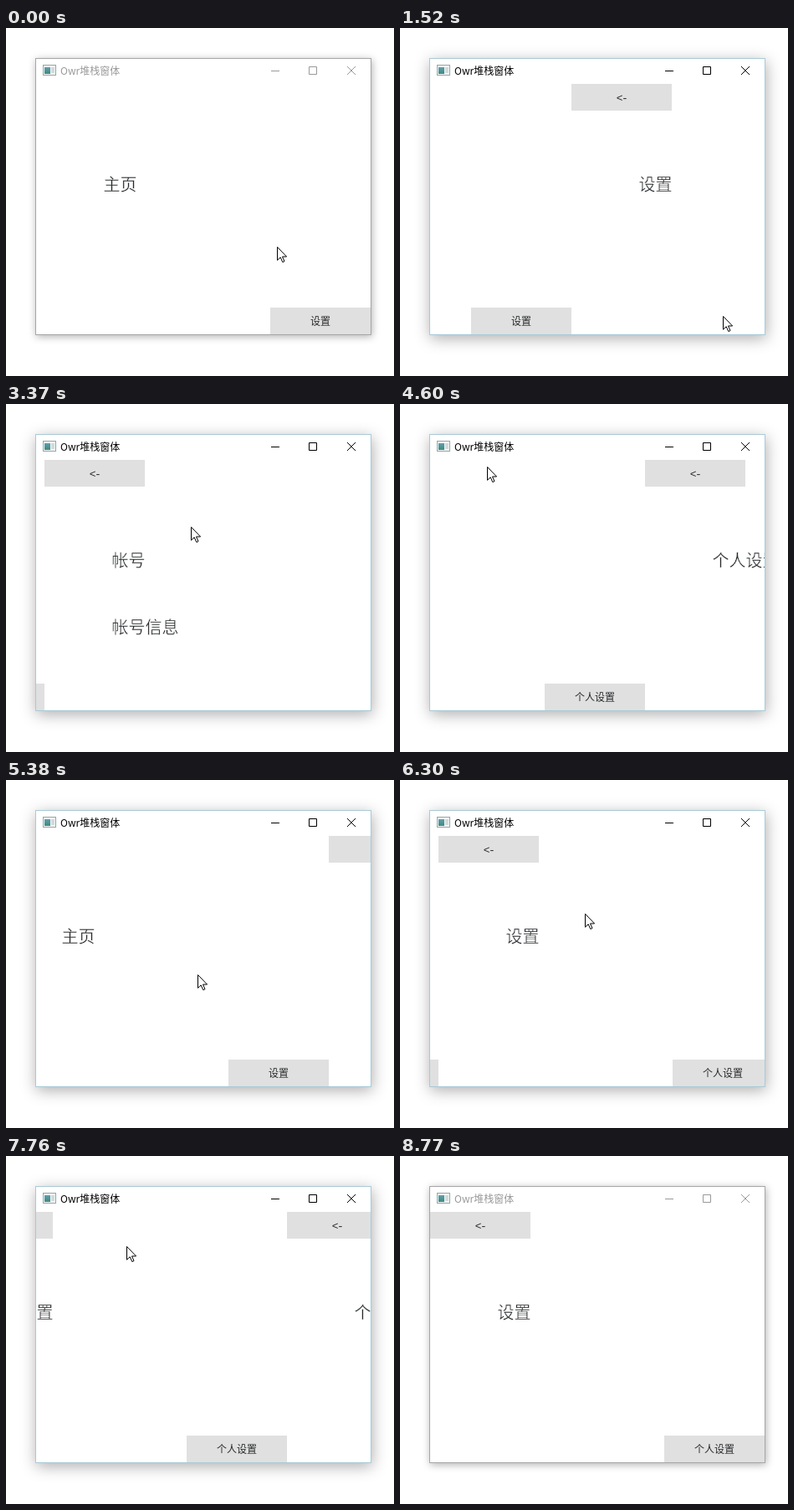
These frames come from a looping animation (464 by 417 pixels, 8.85 s). An HTML page:

```html
<!DOCTYPE html>
<html lang="zh-CN">
<head>
<meta charset="utf-8">
<style>
  html, body { margin: 0; width: 100%; height: 100%; overflow: hidden; background: #fff; }
  svg { display: block; }
  text { font-family: "Noto Sans CJK SC", "Noto Sans CJK", "Noto Sans", sans-serif; }
  .shadow { fill: #fff; filter: drop-shadow(1px 2px 5px rgba(0,0,0,.3)); }
  .edge { fill: #fff; stroke: #a6a6a6; }
  .caption { fill: #999; stroke: #999; }
  .caption text { font-size: 12px; stroke: none; }
  .caption path { fill: none; }
  .active .shadow { filter: drop-shadow(1px 4px 9px rgba(0,0,0,.32)); }
  .active .edge { stroke: #a9cad6; }
  .active .caption { fill: #000; stroke: #000; }
  .page { fill: #26282a; }
  .title { font-size: 20px; stroke: #fff; stroke-width: .4px; }
  .label { font-size: 12px; text-anchor: middle; }
  .back { font: 13px "Liberation Mono", monospace; letter-spacing: -1.5px; text-anchor: middle; }
  #cursor { fill: #fff; stroke: #000; }
</style>
</head>
<body>
<svg width="464" height="417" viewBox="0 0 464 417">
  <defs>
    <clipPath id="content"><rect x="36" y="67" width="400" height="300"/></clipPath>
    <linearGradient id="teal" x2="0" y2="1">
      <stop stop-color="#5f9fb0"/><stop offset="1" stop-color="#3f8a7c"/>
    </linearGradient>
  </defs>
  <g id="window">
    <rect class="shadow" x="35" y="36" width="402" height="332"/>
    <rect class="edge" x="35.5" y="36.5" width="401" height="331"/>
    <rect x="44.5" y="44.5" width="15" height="12" fill="#f3f6f6" stroke="#98a3a6"/>
    <rect x="46" y="47" width="7" height="8" fill="url(#teal)"/>
    <rect x="54" y="47" width="4" height="7" fill="#d3dbdc"/>
    <g class="caption">
      <text x="65" y="56">Owr堆栈窗体</text>
      <path d="M317 51.5h10M362.5 46.5h9v9h-9zM408 46l10 10M418 46l-10 10"/>
    </g>
  </g>
  <g clip-path="url(#content)"><g id="pages" transform="translate(36 67)"></g></g>
  <path id="cursor" d="M.5 .5V16.3L4.2 12.8L6.8 18.6L9 17.6L6.5 12H11.6Z"/>
</svg>
<script>
const LOOP = 8850, TICKS_PER_LOOP = 115;
const PAGE_WIDTH = 400, SLIDE = 400;
const FOCUS = 590, BLUR = 8770;
const $ = id => document.getElementById(id);

const pages = [
  { titles: ['主页'], next: '设置' },
  { titles: ['设置'], next: '个人设置', back: true },
  { titles: ['个人设置'], next: '帐号', back: true },
  { titles: ['帐号', '帐号信息'], back: true }
];

// Places the pointer visits; "step" is how a click there changes the page depth.
const start = { x: 324, y: 262 };
const titleBar = { x: 280, y: 66 };
const next = { x: 386, y: 345, step: 1 };
const back = { x: 104, y: 75, step: -1 };
const hover = { x: 221, y: 160 };
const rest = { x: 193, y: 131 };
const outside = { x: 430, y: 440 };

const visits = [
  [0, start], [880, titleBar],
  [1420, next], [2080, next], [3087, next],
  [3945, back], [4484, back], [5180, back],
  [6017, next], [6350, hover], [6902, next],
  [7542, back], [8150, rest], [8480, outside]
];

const button = (x, y, text, kind) =>
  `<rect x="${x}" y="${y}" width="120" height="32" fill="#e0e0e0"/>` +
  `<text class="${kind}" x="${x + 60}" y="${y + 20.5}">${text}</text>`;

const pageMarkup = page => '<g class="page">' +
  page.titles.map((text, i) => `<text class="title" x="80.5" y="${127.5 + 80 * i}">${text}</text>`).join('') +
  (page.back ? button(0, 0, '&lt;-', 'back') : '') +
  (page.next ? button(280, 268, page.next, 'label') : '') + '</g>';

$('pages').innerHTML = pages.map(pageMarkup).join('');
const pageNodes = [...$('pages').children];

const easeOut = (p, power) => 1 - (1 - Math.min(1, p)) ** power;
const mix = (a, b, p) => Math.round(a + (b - a) * p);

// Every click slides the stack by one page.
const depthAt = t => visits.reduce((depth, [at, { step = 0 }]) =>
  t < at ? depth : depth + step * easeOut((t - at) / SLIDE, 3), 0);

// The pointer leaves right after a visit and arrives a little before the next one.
function pointerAt(t) {
  const i = visits.findIndex(([at]) => at > t);
  if (i < 0) return outside;
  const [t0, from] = visits[i - 1], [t1, to] = visits[i];
  const p = (t - t0) / (t1 - t0) / 0.78;
  return {
    x: mix(from.x, to.x, easeOut(p, 1.6)),
    y: mix(from.y, to.y, easeOut(p, 2.4))
  };
}

// The picture advances in even ticks, rounded to 10 ms.
function tick(t) {
  const length = 77.2, lead = TICKS_PER_LOOP * length - LOOP;
  const n = Math.floor((t + lead + 5) / length);
  return Math.max(0, Math.round((n * length - lead) / 10) * 10);
}

function render(time) {
  const t = tick(time % LOOP);
  const depth = depthAt(t);
  pageNodes.forEach((node, i) =>
    node.setAttribute('transform', `translate(${Math.round(PAGE_WIDTH * (i - depth))} 0)`));
  $('window').classList.toggle('active', t >= FOCUS && t < BLUR);
  const { x, y } = pointerAt(t);
  $('cursor').setAttribute('transform', `translate(${x} ${y})`);
}

const origin = performance.now();
function loop() {
  render(performance.now() - origin);
  requestAnimationFrame(loop);
}
loop();
</script>
</body>
</html>
```
